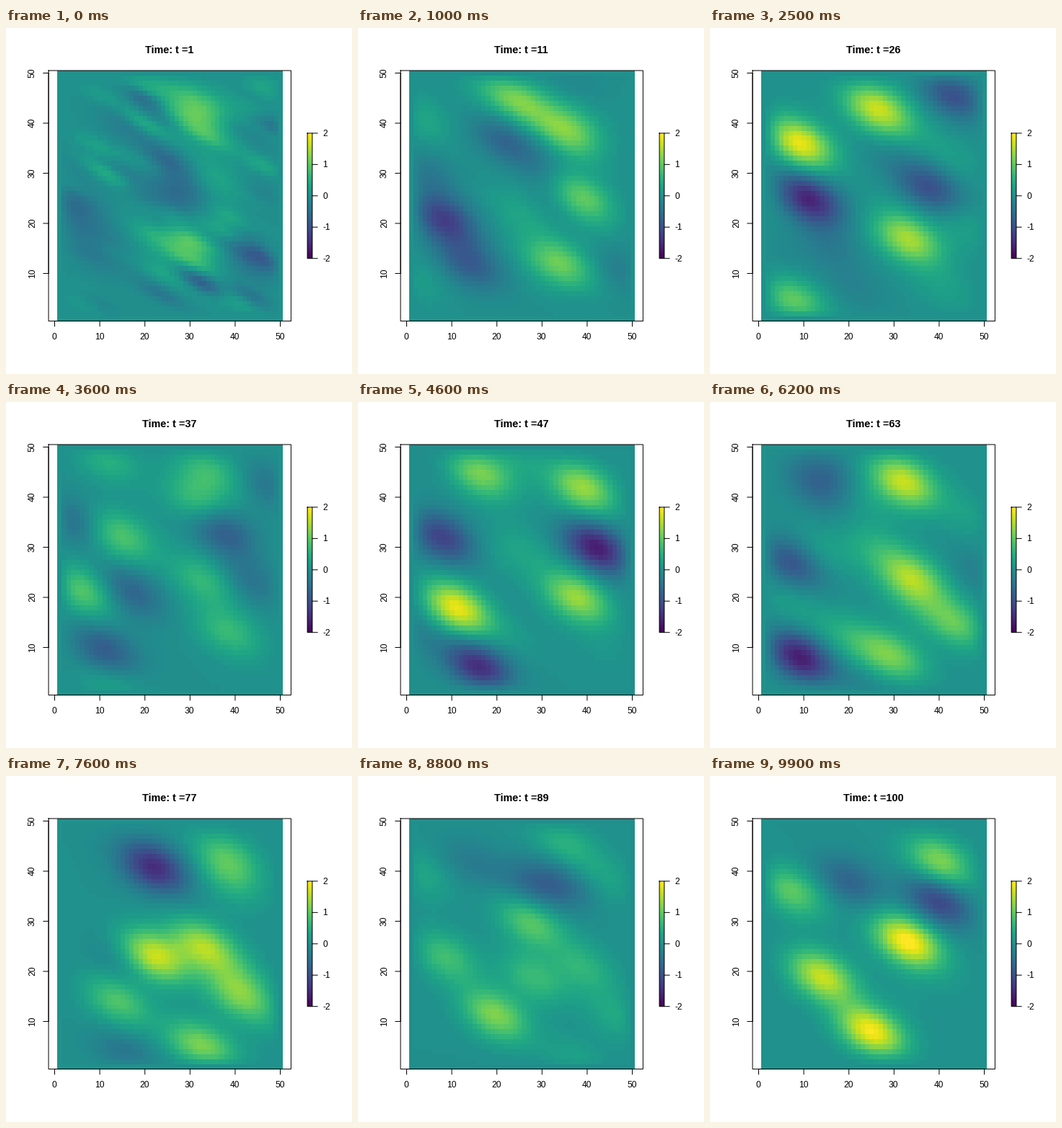
A matplotlib script that plays this animation: 480x480 px, repeating every 10 s.

```python
import numpy as np
import matplotlib.pyplot as plt
from matplotlib.animation import FuncAnimation

plt.rcParams["font.family"] = "Liberation Sans"

SIZE, N, FRAMES = 480, 50, 100
DRIFT = 0.5, -0.35  # cells per time step
TILT = np.radians(-25)
MEMORY = 9  # time steps

# The main highs and lows of the field, (x, y, value), at a few times
PEAKS = {
    1: [(32, 43, 1.1), (29, 28, -.5), (24, 17, .6), (44, 14, -.7)],
    11: [(25, 44, 1.3), (35, 38, 1.3), (22, 37, -.7), (8, 21, -1.3),
         (14, 12, -.9), (38, 25, 1), (34, 12, 1.1)],
    26: [(26, 43, 1.7), (9, 36, 1.9), (43, 46, -1), (11, 25, -1.6),
         (38, 27, -1), (33, 17, 1.5), (8, 4, 1)],
    47: [(16, 45, 1.2), (39, 42, 1.4), (8, 32, -1.2), (42, 30, -1.7),
         (38, 20, 1.4), (11, 18, 1.9), (16, 6, -1.5)],
    63: [(32, 43, 1.7), (13, 42, -.7), (7, 27, -.9), (34, 24, 1.6),
         (43, 15, 1.1), (30, 8, 1.2), (9, 8, -1.7)],
    77: [(38, 43, 1), (22, 41, -1.5), (22, 23, 1.7), (33, 25, 1.6),
         (41, 15, 1.3), (14, 14, .9), (32, 5, 1.2)],
    100: [(40, 42, 1.2), (40, 34, -1.1), (20, 38, -.7), (33, 26, 2.1),
          (14, 19, 1.7), (25, 8, 2), (7, 36, 1)],
}


def edge(x, y):
    """Zero on the outermost cells, close to one inside."""
    def side(c):
        return 1 - np.exp(-np.minimum(c - 1, N - c) / 1.6)
    return side(x) * side(y)


def bump(dx, dy, length, width):
    u = dx * np.cos(TILT) + dy * np.sin(TILT)
    v = dy * np.cos(TILT) - dx * np.sin(TILT)
    return np.exp(-0.5 * ((u / length) ** 2 + (v / width) ** 2))


def covariance(p, q):
    """Drifting space-time covariance of (x, y, t) points."""
    dx, dy, dt = (a[:, None] - b[None, :] for a, b in zip(p, q))
    near = bump(dx - DRIFT[0] * dt, dy - DRIFT[1] * dt, 5.5, 3.2)
    taper = edge(*p[:2])[:, None] * edge(*q[:2])[None, :]
    return taper * near * np.exp(-0.5 * (dt / MEMORY) ** 2)


# Gaussian process through the peaks
px, py, pt, value = np.array(
    [(x, y, t, v) for t, peaks in PEAKS.items() for x, y, v in peaks], float).T
KNOWN = px, py, pt
WEIGHTS = np.linalg.solve(covariance(KNOWN, KNOWN) + 0.02 * np.eye(len(px)), value)

gy, gx = (g.ravel() for g in np.mgrid[1:N + 1, 1:N + 1].astype(float))

# Fine streaks that the early field starts from
rng = np.random.default_rng(4)
streak_x, streak_y = rng.uniform(1, N, (2, 70))
streak_amp = rng.normal(0, 0.3, 70)


def field_at(t):
    z = covariance((gx, gy, np.full(gx.size, float(t))), KNOWN) @ WEIGHTS
    age = t - 1
    streaks = bump(gx[:, None] - streak_x - DRIFT[0] * age,
                   gy[:, None] - streak_y - DRIFT[1] * age, 4, 1.2) @ streak_amp
    z += edge(gx, gy) * streaks * np.exp(-age / 4)
    return z.reshape(N, N)


fig = plt.figure(figsize=(SIZE / 72, SIZE / 72), dpi=72, facecolor="white")
ax = fig.add_axes([0, 0, 1, 1])
ax.axis("off")

LEFT, TOP, RIGHT, BOTTOM = 59.04, 59.04, 395.4, 406.56
BAR_LEFT, BAR_TOP, BAR_RIGHT, BAR_BOTTOM = 418.1, 145.92, 424.92, 319.68
TICK = 7.2

style = dict(cmap=plt.get_cmap("viridis", 100), vmin=-2, vmax=2, origin="lower",
             interpolation="nearest", aspect="auto")
image = ax.imshow(field_at(1), extent=(71, 384, 407, 59), **style)
ax.imshow(np.linspace(-2, 2, 100)[:, None], extent=(418, 425, 320, 146), **style)
ax.set_xlim(0, SIZE)
ax.set_ylim(SIZE, 0)


def line(xs, ys):
    ax.plot(xs, ys, color="black", lw=1, snap=False,
            solid_capstyle="projecting", solid_joinstyle="miter")


def box(x0, y0, x1, y1):
    line([x0, x1, x1, x0, x0], [y0, y0, y1, y1, y0])


def label(x, y, s, **kw):
    return ax.text(x, y, s, **{"fontsize": 12, "ha": "center", "va": "baseline", **kw})


box(LEFT, TOP, RIGHT, BOTTOM)
box(BAR_LEFT, BAR_TOP, BAR_RIGHT, BAR_BOTTOM)

xs = 67.5 + 6.26 * np.arange(0, N + 1, 10)
ys = BOTTOM - 6.95 * (np.arange(10, N + 1, 10) - 0.5)
line(xs[[0, -1]], [BOTTOM, BOTTOM])
line([LEFT, LEFT], ys[[0, -1]])
for i, x in enumerate(xs):
    line([x, x], [BOTTOM, BOTTOM + TICK])
    label(x - 0.6, 432.2, str(10 * i))
for i, y in enumerate(ys, 1):
    line([LEFT - TICK, LEFT], [y, y])
    label(43, y - 0.6, str(10 * i), rotation=90, ha="right", va="center")

for v in range(-2, 3):
    y = (BAR_TOP + BAR_BOTTOM) / 2 - v * (BAR_BOTTOM - BAR_TOP) / 4
    line([BAR_RIGHT, BAR_RIGHT + TICK], [y, y])
    label(439, y + 4, str(v), ha="left")

title = label(226.8, 35, "", fontsize=14.4, fontweight="bold")


def update(i):
    image.set_data(field_at(i + 1))
    title.set_text(f"Time: t ={i + 1}")
    return image, title


anim = FuncAnimation(fig, update, frames=FRAMES, interval=100,
                     repeat=True, repeat_delay=0, blit=False)
plt.show()
```
